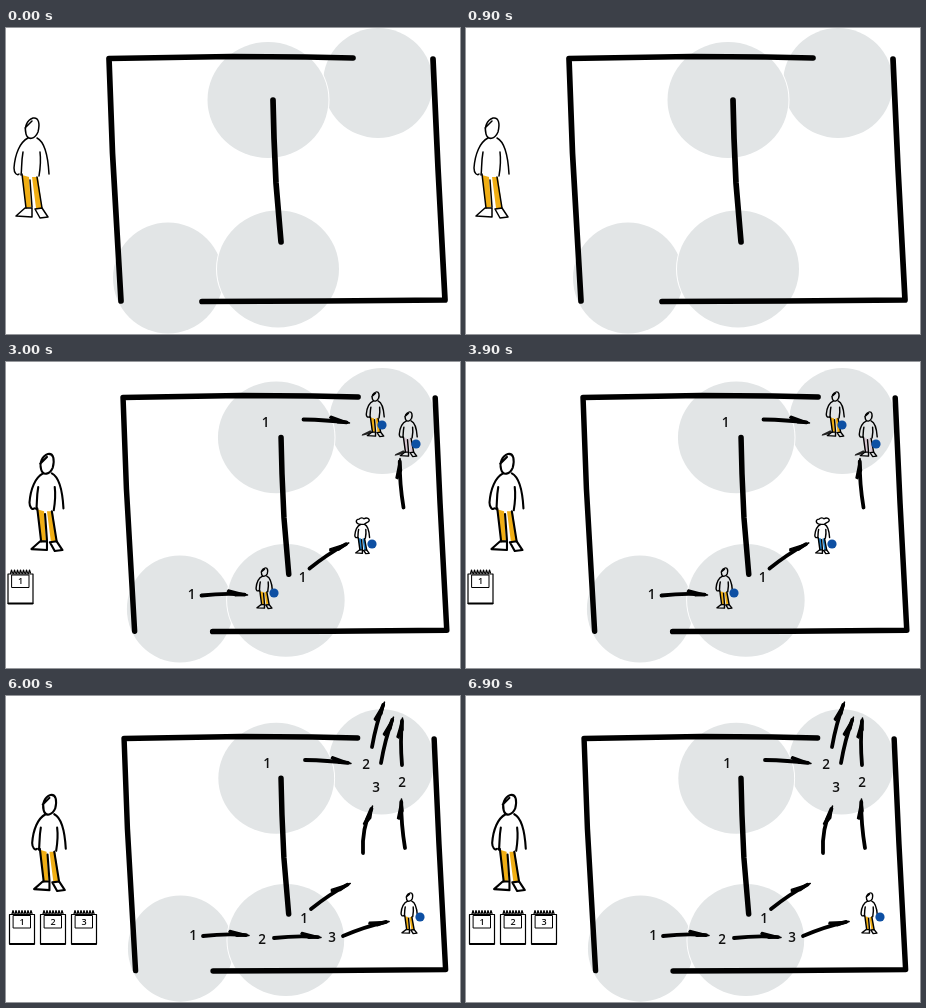
Write an HTML page with a canvas that moves like this. It is 454 px wide and 306 px high and loops after 7500 ms.

```html
<!DOCTYPE html>
<html lang="en">
<head>
<meta charset="utf-8">
<title>People moving between rooms</title>
<style>
html, body { margin: 0; width: 100%; height: 100%; overflow: hidden; background: #fff; }
canvas { display: block; }
</style>
</head>
<body>
<canvas id="stage" width="454" height="306"></canvas>
<script>
const ctx = document.getElementById('stage').getContext('2d');
const HOLD = 1500;
const YELLOW = '#f0ae14', BLUE = '#2080c8', PINK = '#d8c6d2', BADGE = '#0d4fa3';

const shape = {
  head: new Path2D('M2 0C-4 2-7 9-5 16C-3 23 4 21 7 14C9 6 8-1 2 0ZM-6 10L1 3'),
  curls: new Path2D('M-5 20C-16 18-16 6-7 6C-3 0 3 2 5 5C12-1 20 7 16 12C13 16 8 15 6 20Z'),
  coat: new Path2D('M-3 20C-11 24-16 36-17 50C-17 55-14 58-12 56M6 20C14 24 17 38 18 56M-8 34C-10 45-9 52-10 57M9 34C10 42 9 52 8 58'),
  trousers: new Path2D('M-9 57L-2 59L0 89L-5 90ZM1 59L7 59L11 90L5 90Z'),
  seams: new Path2D('M-9 56L-5 90M-1 62L1 89M6 59L11 90'),
  shoes: new Path2D('M-6 90L-15 98L1 99L1 90ZM4 91L9 100L17 99L11 90Z'),
  kick: new Path2D('M-9 86L-25 95L-26 98L-12 95L-6 90Z')
};

function at(x, y, scale, draw) {
  ctx.save();
  ctx.translate(x, y);
  ctx.scale(scale, scale);
  draw();
  ctx.restore();
}

function line(width, ...points) {
  ctx.lineWidth = width;
  ctx.beginPath();
  points.forEach(([x, y]) => ctx.lineTo(x, y));
  ctx.stroke();
}

function fill(path, color) {
  ctx.fillStyle = color;
  ctx.fill(path);
}

function dot(x, y, rx, ry, color) {
  ctx.beginPath();
  ctx.ellipse(x, y, rx, ry, 0, 0, 7);
  ctx.fillStyle = color;
  ctx.fill();
}

// x is the middle of the figure, y the top of its head
function person(x, y, height, { width = 1.25, girth = 1, legs = YELLOW, kick, head = shape.head } = {}) {
  const scale = height / 101;
  at(x, y, scale, () => {
    ctx.scale(girth, 1);
    ctx.lineWidth = width / scale;
    if (kick) fill(shape.kick, kick);
    fill(shape.trousers, legs);
    for (const path of [head, shape.coat, shape.seams, shape.shoes]) ctx.stroke(path);
  });
}

function walker(x, y, height, badgeX, badgeY, look) {
  person(x, y, height, { girth: 1.15, ...look });
  dot(badgeX, badgeY, 4.6, 4.6, BADGE);
}

function room(scale, x, y) {
  at(x, y, scale, () => {
    for (const [cx, cy, rx, ry] of [
      [372, 55, 55, 55], [162, 250, 55, 55.5], [262, 72, 60.5, 58], [272, 241, 61, 58.5]
    ]) {
      dot(cx, cy, rx + 1, ry + 1, '#fff');
      dot(cx, cy, rx, ry, '#e2e5e6');
    }
    line(5.7, [347, 30], [300, 29], [225, 28.5], [103, 30.5], [106.5, 125], [115, 273]);
    line(5.7, [196, 273.5], [320, 273], [439, 272], [432, 140], [427, 31]);
    line(5.7, [267, 72], [268, 110], [270, 155], [275, 214]);
  });
}

// a bowed shaft with a wedge on its left side
function arrow(x1, y1, x2, y2, bend = 2) {
  const length = Math.hypot(x2 - x1, y2 - y1);
  ctx.save();
  ctx.translate(x1, y1);
  ctx.rotate(Math.atan2(y2 - y1, x2 - x1));
  ctx.lineWidth = 3.8;
  ctx.beginPath();
  ctx.moveTo(0, 0);
  ctx.quadraticCurveTo(length / 2, -bend, length - 3, 0);
  ctx.stroke();
  ctx.lineWidth = 1.5;
  ctx.fillStyle = '#000';
  ctx.beginPath();
  ctx.moveTo(length, 0.5);
  ctx.lineTo(length - 19, -5);
  ctx.lineTo(length - 20, -3.5);
  ctx.lineTo(length - 12, 1);
  ctx.closePath();
  ctx.fill();
  ctx.stroke();
  ctx.restore();
}

function digit(n, x, y, size = 13.5) {
  ctx.font = '600 ' + size + 'px "Open Sans", sans-serif';
  ctx.fillStyle = '#111';
  ctx.fillText(n, x, y + size * 0.36);
}

function notepad(n) {
  at(3 + (n - 1) * 31, 213, 1, () => {
    ctx.lineWidth = 1.2;
    ctx.strokeRect(0.5, 5.5, 25, 29.5);
    line(1.8, [1, 35], [25, 35]);
    ctx.lineWidth = 1;
    ctx.strokeRect(4.5, 6.5, 17, 12.5);
    for (let x = 3; x < 24; x += 3) line(1.2, [x, 5], [x + 1, 1.5], [x + 2, 4.5]);
    digit(n, 13, 12.5, 9);
  });
}

function firstMoves() {
  arrow(299, 64, 345, 67, 1);
  arrow(197, 240, 243, 239);
  arrow(305, 213, 344, 187);
  arrow(399, 152, 395, 103);
  digit(1, 261, 67);
  digit(1, 187, 239);
  digit(1, 298, 222);
  notepad(1);
}

function secondMoves() {
  room(0.957, 19.5, 13.3);
  person(42.5, 99, 97, { width: 2.1 });
  firstMoves();
  arrow(268, 242, 315, 241);
  arrow(357, 157, 366, 110, 6);
  arrow(366, 51, 378, 6);
  arrow(396, 69, 396, 22);
  digit(2, 360, 68);
  digit(2, 396, 86);
  digit(2, 256, 243);
  notepad(2);
}

const curly = { legs: BLUE, head: shape.curls };

const scenes = [
  () => {
    room(1, 0, 0);
    person(25, 90, 101, { width: 1.5 });
  },
  () => {
    room(1, 0, 0);
    person(25, 90, 101, { width: 2.1 });
    walker(244, 42, 48, 252, 78, { kick: '#222' });
    walker(394, 111, 46, 402, 145, { legs: PINK, kick: PINK });
    walker(145, 230, 41, 155, 256);
    walker(298, 213, 39, 308, 241, curly);
  },
  () => {
    room(0.9635, 17.8, 6.1);
    person(40, 92, 98, { width: 2.1 });
    at(-1.5, -6.5, 1, firstMoves);
    walker(369, 30, 45, 376, 63, { kick: '#222' });
    walker(402, 50, 45, 410, 82, { legs: PINK, kick: '#222' });
    walker(356, 155, 37, 366, 182, curly);
    walker(258, 206, 41, 268, 231);
  },
  () => {
    secondMoves();
    walker(372, 67, 38, 381, 93, curly);
    walker(329, 222, 41, 340, 247);
  },
  () => {
    secondMoves();
    arrow(375, 67, 387, 21);
    arrow(337, 240, 383, 225);
    digit(3, 370, 91);
    digit(3, 326, 241);
    notepad(3);
    walker(403, 197, 41, 414, 221);
  }
];

ctx.strokeStyle = '#000';
ctx.lineCap = ctx.lineJoin = 'round';
ctx.textAlign = 'center';

const start = performance.now();
function frame() {
  const time = performance.now() - start;
  ctx.clearRect(0, 0, 454, 306);
  scenes[Math.floor(time / HOLD) % scenes.length]();
  requestAnimationFrame(frame);
}
frame();
</script>
</body>
</html>
```
